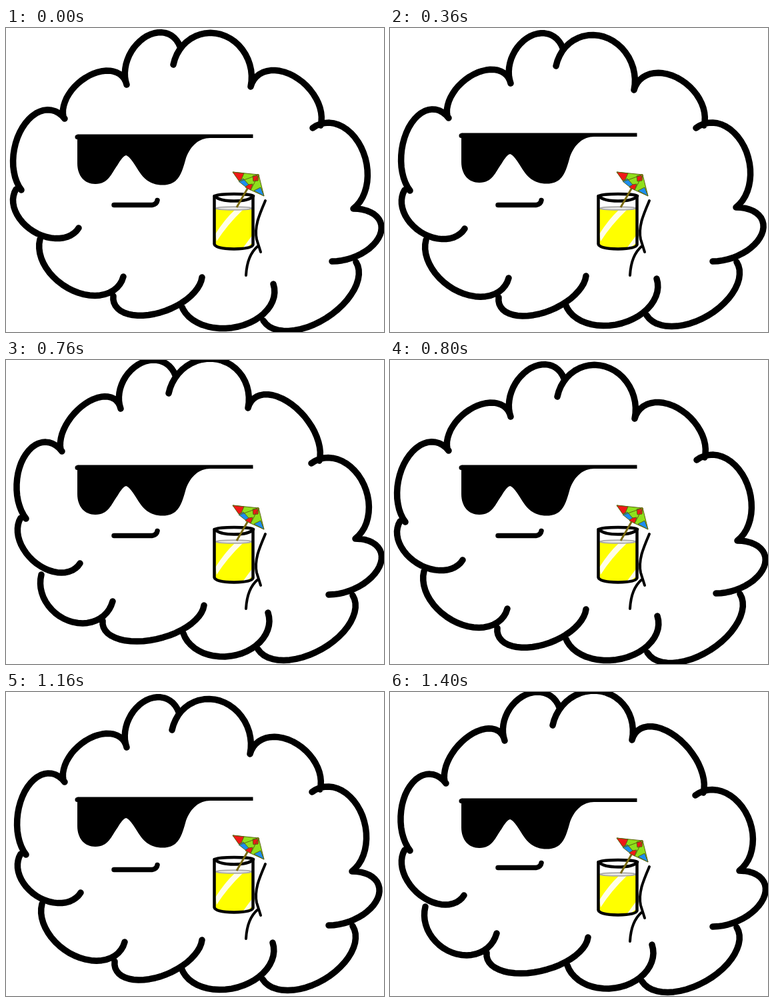
Write an HTML page that moves like this. It is 567 px wide and 456 px high and loops after 1.6 s.

```html
<!DOCTYPE html>
<html lang="en">
<head>
<meta charset="utf-8">
<title>Cool cloud</title>
<style>
  html, body { margin: 0; width: 100%; height: 100%; overflow: hidden; background: #fff; }
  svg { display: block; width: 567px; height: 456px; }
  .ink { fill: none; stroke: #000; stroke-linecap: round; stroke-linejoin: round; }
</style>
</head>
<body>
<svg viewBox="0 0 567 456">
  <path id="cloud" class="ink" stroke-width="9.5"/>
  <g id="glasses">
    <path d="M107 159.500H370.500V165H306C290 165 277 176 270 195C264 216 260 235.500 235 235.500C215 235.500 205 225 195 208Q185 192 180 191Q175 192 167 206C158 218 154 234 134 234C118 234 107 222 107 203Z"/>
    <path class="ink" stroke-width="7" d="M107 163.500H111"/>
  </g>
  <path id="mouth" class="ink" stroke-width="7.500" d="M162 265.500H219Q226 264.500 227 258.500"/>
  <g id="drink">
    <path fill="#ff0" d="M313 270H371V325Q368 331 342 331Q316 331 313 325Z"/>
    <path fill="#fffde8" d="M343 273H355Q332 295 316 320L314 309Q328 287 343 273ZM370 310V322L361 329H356Z"/>
    <ellipse cx="342" cy="270.500" rx="27" ry="2.300" fill="#eee" stroke="#aaa" stroke-width="2"/>
    <g class="ink" stroke-width="4.500">
      <path d="M312.500 252V324Q314 331 342 331.500Q369 331 370.500 325V252"/>
      <path d="M313 252Q320 249 342 249Q366 249 371 252Q365 259.500 342 259.500Q320 259.500 313 252Z"/>
      <path stroke-width="4" d="M389 259C380 280 372 298 376 317L382 336M378 327C366 337 361 352 360 371"/>
    </g>
    <path stroke="#7a6a10" stroke-width="3" d="M365 236L346 269"/>
    <g stroke="#5b6410" stroke-width="1" stroke-linejoin="round">
      <path fill="#8fe01c" d="M340 216L379 220L387 252L367 243L351 230Z"/>
      <path fill="#f01818" d="M340 216L357 218L353 227L349 229ZM363 235L370 234L367 243L359 239ZM370 222L379 220L378 229L371 230Z"/>
      <path fill="#1c8df0" d="M349 230L356 226L364 235L359 238ZM372 244L382 239L387 252Z"/>
      <path fill="none" d="M379 220L351 230M379 220L367 243"/>
      <circle cx="378" cy="221" r="1.500" fill="#a98b20"/>
    </g>
  </g>
</svg>
<script>
// Each lobe is a skewed half ellipse between two neighbouring valleys.
// bulge: apex relative to the chord's middle; from, to: tails beyond the valleys.
const lobes = [
  { bulge: [-15, -41] },
  { bulge: [13, -62], from: [-10, 27] },
  { bulge: [12, -45] },
  { bulge: [42, -32], from: [-12, 4] },
  { bulge: [56, 0], to: [-36, -1] },
  { bulge: [25, 40] },
  { bulge: [16, 48], from: [15, -55] },
  { bulge: [-5, 41], from: [31, -42] },
  { bulge: [-13, 49], from: [15, -29] },
  { bulge: [-21, 34], from: [58, -17] },
  { bulge: [-31, -40], from: [8, 1], to: [2, 3] },
  { bulge: [-8, -38] }
];
// Valleys of the four poses, clockwise from the top left.
const poses = [
  '181,85 261,28 367,88 472,146 521,271 525,351 386,439 263,416 161,402 51,317 15,242 86,133',
  '181,83 259,30 366,93 471,146 519,269 520,351 385,431 263,414 163,404 54,318 22,243 86,132',
  '177,84 260,25 367,90 467,149 515,272 516,356 379,427 263,415 163,402 52,320 22,243 90,135',
  '172,73 254,23 363,72 470,151 524,268 520,353 378,434 266,410 145,391 53,322 22,237 82,134'
];

const add = (a, b) => [a[0] + b[0], a[1] + b[1]];

function lobePath(start, end, bulge) {
  let d = '';
  for (let i = 0; i <= 24; i++) {
    const angle = Math.PI * i / 24, c = Math.cos(angle), s = Math.sin(angle);
    const point = [0, 1].map(k =>
      ((start[k] + end[k]) / 2 + (start[k] - end[k]) / 2 * c + bulge[k] * s).toFixed(1));
    d += (i ? 'L' : 'M') + point;
  }
  return d;
}

const clouds = poses.map(pose => {
  const valleys = pose.split(' ').map(v => v.split(',').map(Number));
  return lobes.map(({ bulge, from = [0, 0], to = [0, 0] }, i) =>
    lobePath(add(valleys[i], from), add(valleys[(i + 1) % lobes.length], to), bulge)).join('');
});

// Vertical offsets in pixels at time t in ms.
const bobs = {
  glasses: t => t >= 40 && (t + 40) % 400 < 200 ? -2 : 0,
  mouth: t => t < 440 ? 0 : t >= 960 && t < 1240 ? 1 : -2,
  drink: t => t < 600 ? 0 : t < 960 ? 2 : t < 1240 ? -1 : 3
};

const byId = id => document.getElementById(id);
const begin = performance.now();

function tick() {
  const t = (performance.now() - begin) % 1600;
  byId('cloud').setAttribute('d', clouds[Math.floor(t / 200) % 4]);
  for (const id in bobs) byId(id).setAttribute('transform', `translate(0 ${bobs[id](t)})`);
  requestAnimationFrame(tick);
}
tick();
</script>
</body>
</html>
```
